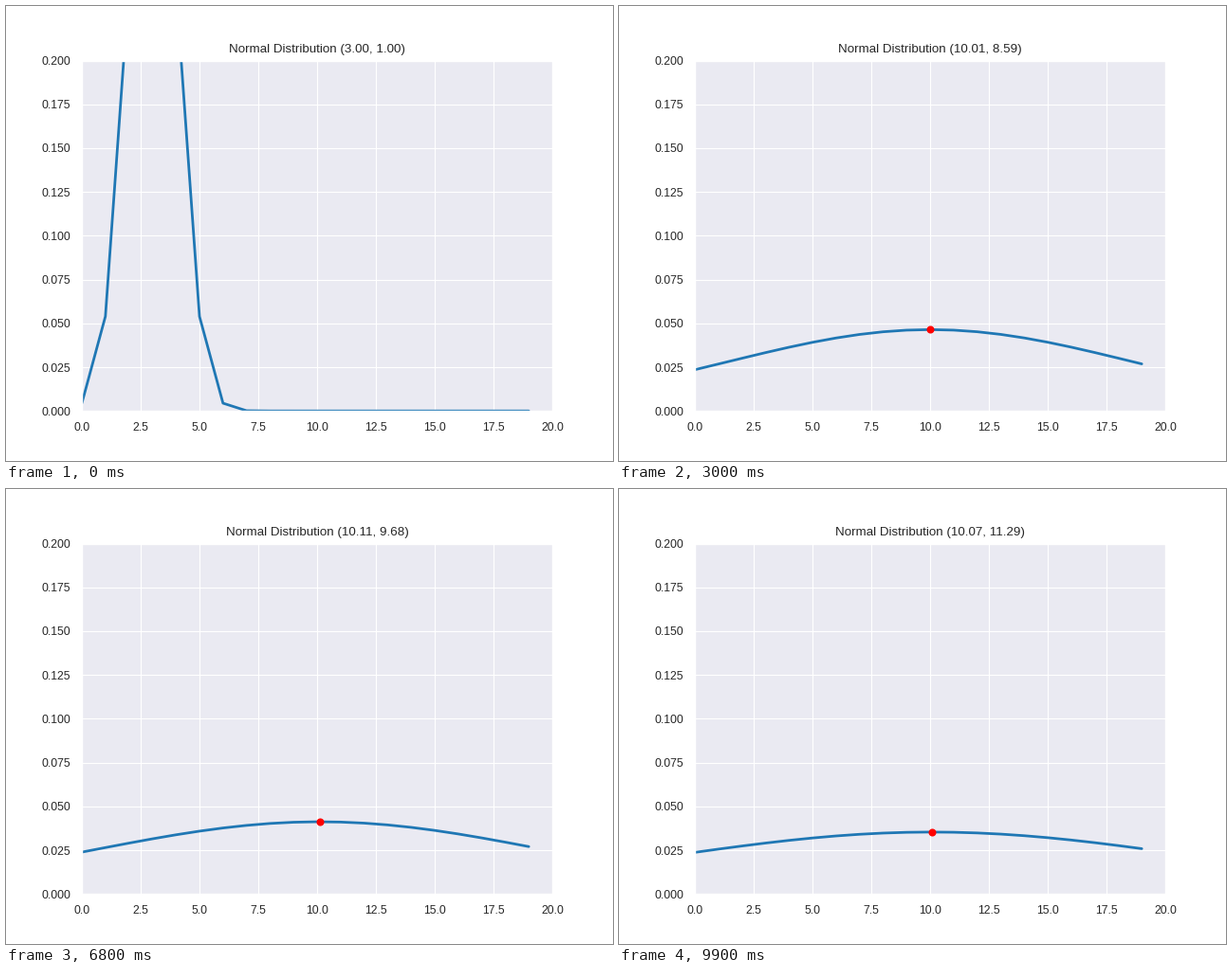
These frames come from a looping animation (640 by 480 pixels, 10000 ms). A matplotlib script:

```python
import numpy as np
import matplotlib.pyplot as plt
from matplotlib.animation import FuncAnimation

FRAMES, INTERVAL = 100, 100

plt.rcParams.update({
    "font.family": "Liberation Sans",
    "text.color": ".15",
    "axes.facecolor": "#EAEAF2",
    "axes.edgecolor": "white",
    "axes.linewidth": 1,
    "axes.grid": True,
    "axes.axisbelow": True,
    "axes.titlesize": 9.6,
    "grid.color": "white",
    "grid.linewidth": 0.8,
    "lines.solid_capstyle": "round",
})
for axis, sides in (("xtick", ("bottom", "top")), ("ytick", ("left", "right"))):
    plt.rcParams.update({f"{axis}.{side}": False for side in sides})
    plt.rcParams.update({
        f"{axis}.color": ".15",
        f"{axis}.labelsize": 8.8,
        f"{axis}.major.size": 4.8,
        f"{axis}.major.pad": 3.5,
    })

# The fit settles quickly, then drifts between a few key points.
SETTLE = 17
KEYS = [0, SETTLE, 30, 33, 53, 68, 85, 99]
MEANS = [3, 9.46, 10.01, 12.7, 9.29, 10.11, 10.13, 10.07]
SIGMAS = [1, 5.73, 8.59, 7.2, 9.07, 9.68, 10.65, 11.29]


def fit(step):
    if step < SETTLE:
        step = SETTLE * (1 - (1 - step / SETTLE) ** 3)
    return np.interp(step, KEYS, MEANS), np.interp(step, KEYS, SIGMAS)


def pdf(x, mu, sigma):
    return np.exp(-((x - mu) / sigma) ** 2 / 2) / (sigma * np.sqrt(2 * np.pi))


x = np.arange(20)
fig, ax = plt.subplots(figsize=(6.4, 4.8), dpi=100)
ax.set_xlim(0, 20)
ax.set_ylim(0, 0.2)
curve, = ax.plot([], [], color="#1f77b4", lw=2)
peak, = ax.plot([], [], "o", color="red", ms=4.8)
title = ax.set_title("")


def update(step):
    mu, sigma = fit(step)
    curve.set_data(x, pdf(x, mu, sigma))
    peak.set_data([mu], [pdf(mu, mu, sigma)])
    title.set_text(f"Normal Distribution ({mu:.2f}, {sigma:.2f})")
    return curve, peak, title


anim = FuncAnimation(fig, update, frames=FRAMES, interval=INTERVAL,
                     repeat=True, repeat_delay=0)
plt.show()
```
